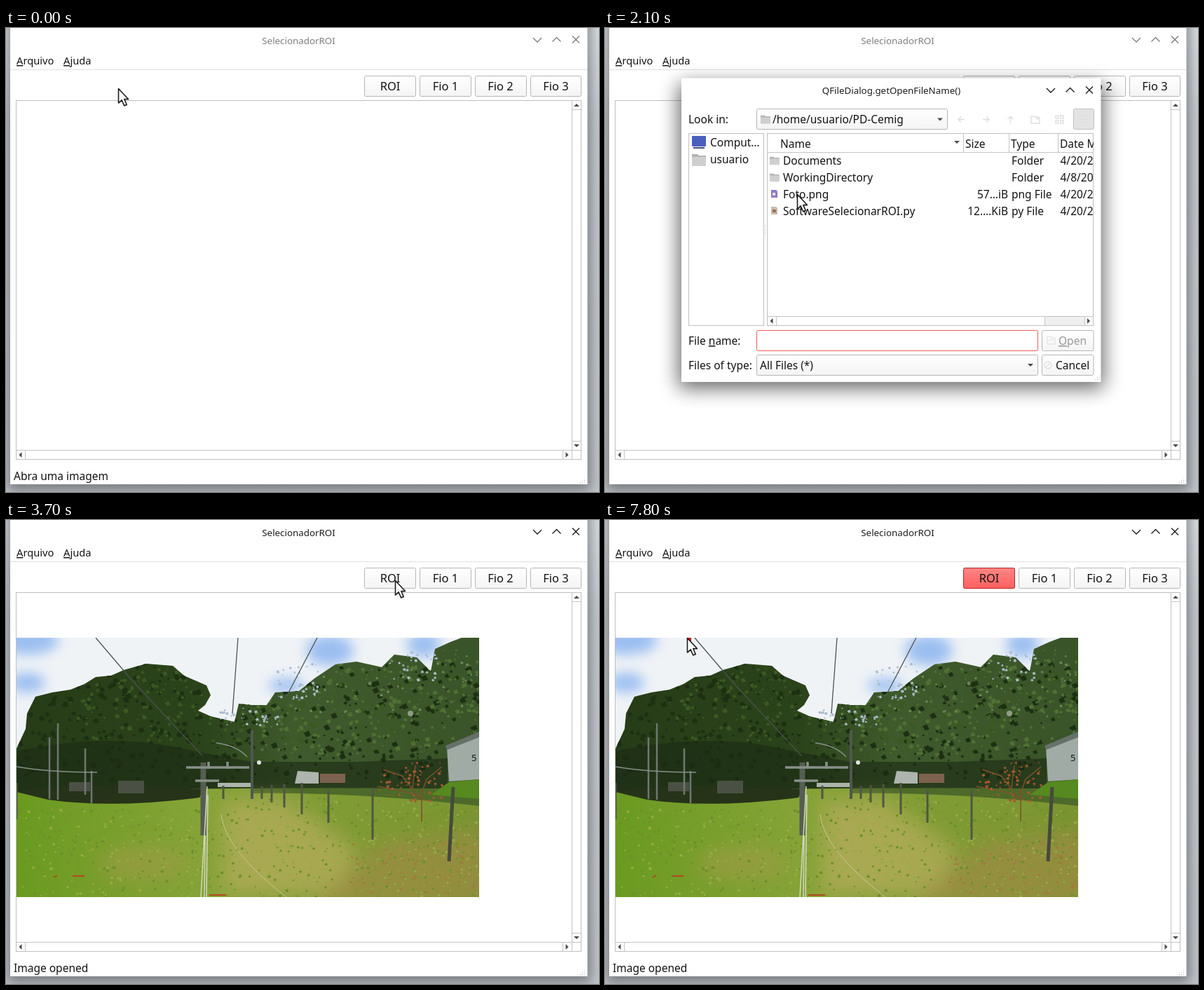
An HTML page for the animation above (8000 ms loop, 846 by 662 pixels).

```html
<!DOCTYPE html>
<html lang="pt">
<head>
<meta charset="utf-8">
<title>SelecionadorROI</title>
<style>
html, body { margin: 0; width: 100%; height: 100%; overflow: hidden; background: #b9bec4; }
svg { display: block; width: 846px; height: 662px; }
text { font: 15.5px "Noto Sans", sans-serif; fill: #141414; white-space: pre; }
.title { font-size: 13.33px; text-anchor: middle; fill: currentColor; }
.menu text, .menu-bar text { font-size: 14.7px; }
.buttons text { font-size: 16.5px; text-anchor: middle; }
.white text { fill: #fff; }
.end { text-anchor: end; }
.u { text-decoration: underline; }
.box { fill: #fff; stroke: #bfbfbf; }
.btn { fill: url(#button); stroke: #b6b6b6; }
.line { fill: none; stroke: #c4c4c4; }
.arrow { fill: #4a4a4a; }
.red { fill: #ec0000; }

.anim { animation: 8s step-end -10ms infinite; }
.focus { animation-name: focus; }
.welcome { animation-name: welcome; }
.menu { animation-name: menu; }
.hover { animation-name: hover; }
.dialog { animation-name: dialog; }
.opened { animation-name: opened; }
.pressed { animation-name: pressed; }
.dot { animation-name: dot; }
.cursor { animation-name: cursor; }

@keyframes focus {
  0%, 18.75% { color: #7d7f80; }
  10%, 33.75%, 100% { color: #1c1e1f; }
}
@keyframes welcome { 0% { opacity: 1; } 8.75%, 100% { opacity: 0; } }
@keyframes menu { 0%, 17.5%, 100% { opacity: 0; } 10% { opacity: 1; } }
@keyframes hover { 0%, 17.5%, 100% { opacity: 0; } 13.75% { opacity: 1; } }
@keyframes dialog { 0%, 30%, 100% { opacity: 0; } 18.75% { opacity: 1; } }
@keyframes opened { 0% { opacity: 0; } 33.75%, 100% { opacity: 1; } }
@keyframes pressed { 0% { opacity: 0; } 48.75%, 100% { opacity: 1; } }
@keyframes dot { 0% { opacity: 0; } 83.75%, 100% { opacity: 1; } }
@keyframes cursor {
  0% { transform: translate(160px, 86px); animation-timing-function: steps(9); }
  11.25% { transform: translate(46px, 50px); animation-timing-function: steps(2); }
  13.75%, 16.25% { transform: translate(53px, 64px); }
  16.25% { animation-timing-function: steps(8); }
  26.25% { transform: translate(274px, 237px); animation-timing-function: steps(5); }
  32.5% { transform: translate(282px, 233px); animation-timing-function: steps(5); }
  38.75% { transform: translate(620px, 322px); animation-timing-function: steps(4); }
  43.75% { transform: translate(538px, 92px); animation-timing-function: steps(2); }
  46.25%, 47.5% { transform: translate(555px, 86px); }
  47.5% { animation-timing-function: steps(9); }
  58.75% { transform: translate(163px, 167px); animation-timing-function: steps(5); }
  65% { transform: translate(136px, 164px); animation-timing-function: steps(4); }
  70% { transform: translate(119px, 169px); animation-timing-function: steps(2); }
  72.5% { transform: translate(118px, 169px); }
  76.25%, 82.5% { transform: translate(118px, 168px); }
  82.5% { animation-timing-function: steps(5); }
  88.75%, 90% { transform: translate(171px, 191px); }
  90% { animation-timing-function: steps(6); }
  97.5%, 100% { transform: translate(117px, 168px); }
}
</style>
</head>
<body>
<svg viewBox="0 0 846 662">
  <defs>
    <linearGradient id="desk" x2="0" y2="1"><stop stop-color="#d9dee3"/><stop offset=".2" stop-color="#c5cad0"/><stop offset="1" stop-color="#c0c5cb"/></linearGradient>
    <linearGradient id="button" x2="0" y2="1"><stop stop-color="#fff"/><stop offset="1" stop-color="#f4f4f4"/></linearGradient>
    <linearGradient id="redButton" x2="0" y2="1"><stop stop-color="#ff8585"/><stop offset="1" stop-color="#ff6060"/></linearGradient>
    <linearGradient id="foliage"><stop stop-color="#263c18"/><stop offset=".4" stop-color="#2b431a"/><stop offset=".6" stop-color="#3f5a2c"/><stop offset="1" stop-color="#3a5429"/></linearGradient>
    <linearGradient id="grass"><stop stop-color="#6a9a20"/><stop offset=".4" stop-color="#86a338"/><stop offset="1" stop-color="#7a9431"/></linearGradient>
    <filter id="soft" x="-20%" y="-20%" width="140%" height="140%"><feGaussianBlur stdDeviation="9"/></filter>
    <filter id="hazy" x="-50%" y="-50%" width="200%" height="200%"><feGaussianBlur stdDeviation="14"/></filter>
    <pattern id="grip" width="3" height="3" patternUnits="userSpaceOnUse"><path d="M0 0h1v1h-1z" fill="#b5b5b5"/></pattern>
    <clipPath id="photoClip"><path d="M15 168H674.500V538H15z"/></clipPath>
    <clipPath id="listClip"><path d="M232 151H697V425H232z"/></clipPath>
    <path id="treeShape" d="M15 326L28 298 30 276 42 252 66 246 92 242 112 234 128 224 150 222 168 214 200 205 238 208 254 222 286 236 292 250 284 264 274 272 292 280 326 288 332 262 350 264 372 264 384 246 418 244 440 226 470 206 500 202 536 210 554 192 586 196 606 216 612 184 634 174 650 168H675V400H15z"/>
    <clipPath id="treeClip"><use href="#treeShape"/></clipPath>
    <path id="lawnShape" d="M15 388Q300 380 675 384V538H15z"/>
    <clipPath id="lawnClip"><path d="M15 412H280L300 392Q500 390 675 410V538H15z"/></clipPath>
    <g id="controls" fill="none" stroke="currentColor" stroke-width="1.4"><path d="M752 14l6 6 6-6M779.500 19.500l6-6 6 6M808 11.500l10 10m0-10l-10 10"/></g>
    <g id="folder"><path d="M0 1h8l2 2h10v14h-20z" fill="#b4b4b4"/><path d="M0 5h20v13h-20z" fill="#cfcfcf"/></g>
    <path id="down" class="arrow" d="M-4-2h8l-4 4z"/>
    <path id="cursorShape" d="M0 0V20.500L4.600 16.300 8.100 24.300 11.700 22.700 8.300 15H14z"/>
  </defs>

  <rect width="846" height="662" fill="url(#desk)"/>
  <rect x="2" y="-30" width="832" height="690" opacity=".38" filter="url(#soft)"/>
  <rect x="6" y="-1" width="823.500" height="652" fill="#fff"/>

  <g class="anim focus">
    <text class="title" x="417.500" y="22.500">SelecionadorROI</text>
    <use href="#controls"/>
  </g>
  <g class="menu-bar">
    <text x="15" y="52"><tspan class="u">A</tspan>rquivo</text>
    <text x="82" y="52"><tspan class="u">A</tspan>juda</text>
  </g>
  <path class="line" style="stroke:#e0e0e0" d="M6 59.500H829"/>

  <g class="buttons">
    <rect class="btn" x="511.500" y="68.500" width="73" height="29" rx="2"/>
    <rect class="btn" x="590.500" y="68.500" width="73" height="29" rx="2"/>
    <rect class="btn" x="669.500" y="68.500" width="73" height="29" rx="2"/>
    <rect class="btn" x="748.500" y="68.500" width="72" height="29" rx="2"/>
    <rect class="anim pressed" x="511.500" y="68.500" width="73" height="29" rx="2" fill="url(#redButton)" stroke="#bd2020"/>
    <text x="548" y="89">ROI</text><text x="627" y="89">Fio 1</text>
    <text x="705.500" y="89">Fio 2</text><text x="784.500" y="89">Fio 3</text>
  </g>

  <rect class="box" x="14.500" y="103.500" width="806" height="512"/>
  <path class="line" d="M807.500 104V615M15 602.500H820M808 116.500h12M808 589.500h12M27.500 603v12M794.500 603v12"/>
  <use href="#down" transform="translate(814 110) scale(1 -1)"/>
  <use href="#down" transform="translate(814 596)"/>
  <use href="#down" transform="translate(20.500 609) rotate(90)"/>
  <use href="#down" transform="translate(800.500 609) rotate(-90)"/>
  <path fill="url(#grip)" d="M828 640V650H817z"/>

  <text class="anim welcome" x="11" y="645">Abra uma imagem</text>
  <text class="anim hover" x="11" y="645">Abrir imagem</text>
  <text class="anim opened" x="11" y="645">Image opened</text>

  <g class="anim opened"><g clip-path="url(#photoClip)">
    <rect x="15" y="168" width="660" height="370" fill="#f0f3f6"/>
    <g fill="#85b1f0" opacity=".8" filter="url(#soft)">
      <ellipse cx="30" cy="172" rx="45" ry="20"/><ellipse cx="30" cy="232" rx="26" ry="14"/>
      <ellipse cx="462" cy="186" rx="34" ry="22"/><ellipse cx="400" cy="236" rx="26" ry="10"/>
      <ellipse cx="596" cy="178" rx="24" ry="18"/>
    </g>
    <use href="#treeShape" fill="url(#foliage)"/>
    <g id="leaves" clip-path="url(#treeClip)"></g>
    <g id="gaps"></g>
    <path d="M15 330Q150 300 270 330L350 345 500 345 630 340V400H15z" fill="#1c2a14" opacity=".6"/>
    <path d="M302 375H350V381H302zM416 358L446 360V376H412z" fill="#aeb5ae"/><path d="M448 362H484V375H448z" fill="#7d6250"/>
    <use href="#lawnShape" fill="url(#grass)"/>
    <path d="M15 388Q90 374 282 384L276 396Q150 412 60 399z" fill="#263318"/>
    <path d="M350 383H620L675 396V408Q500 388 350 390z" fill="#4d6a2a"/>
    <g filter="url(#hazy)">
      <path d="M310 400H400L500 470 480 535H310z" fill="#b2ac58" opacity=".8"/>
      <path d="M540 460L690 440V550H430z" fill="#a08a48" opacity=".65"/>
      <ellipse cx="195" cy="490" rx="65" ry="24" fill="#a29c48" opacity=".6"/>
    </g>
    <g id="blades" clip-path="url(#lawnClip)"></g>
    <path d="M629 325L675 308V370L632 373z" fill="#a0aba5"/><path d="M627 322L675 302V310L629 328z" fill="#66716a"/>
    <path d="M632 374L675 370V398L606 392z" fill="#56891f"/>
    <text x="664" y="344" style="font-size:13px">5</text>
    <path d="M128 168L180 229 280 336M331 168L323 276M444 168L400 252" fill="none" stroke="#4b5352" stroke-width="1.300"/>
    <path d="M90 374h30v13h-30zM160 372h37v18h-37z" fill="#4a5144"/>
    <path d="M62 310V398M74 290V399M113 326V392M122 358V404" stroke="#6f7771" stroke-width="2.500"/>
    <path d="M15 352Q60 360 130 360M300 318Q330 322 344 338" fill="none" stroke="#87908a" stroke-width="1.300"/>
    <path d="M351 300V398" stroke="#4f5750" stroke-width="4"/><path d="M281.500 346V450" stroke="#565d51" stroke-width="8"/>
    <path d="M257 353H347M270 372H304M289 345V355M316 345V355" stroke="#899089" stroke-width="3.500"/>
    <path d="M287 380L278 538M284 450L283 538M288 392L286 538" fill="none" stroke="#d2d7c0" stroke-width="1.500"/>
    <path d="M307 420Q312 470 400 538" fill="none" stroke="#d5d8b0" opacity=".7"/>
    <path d="M15 375V427M310 379V398M365 380V398M379 378V403M397 377V410M422 375V420M460 384V432M523 382V456" fill="none" stroke="#515640" stroke-width="3"/>
    <path d="M638 381L632 487" stroke="#464a3d" stroke-width="5"/>
    <path d="M593 430V385M593 400L565 365 538 356M593 395L570 388 530 380M593 390L600 370 622 352M580 383L584 350" fill="none" stroke="#7c512c" stroke-width="1.500"/>
    <g id="blossom"></g>
    <circle cx="361" cy="346" r="3" fill="#e0e5e2"/><circle cx="577" cy="276" r="4" fill="#8f9c82"/>
    <path d="M95 508h17M68 510l5-3M290 535h24" stroke="#b04a22" stroke-width="2"/>
  </g></g>
  <rect class="anim dot" x="117.500" y="168" width="5.500" height="5" fill="#e30613"/>

  <g class="anim menu">
    <rect class="red" x="11" y="34" width="61" height="26"/>
    <g class="white"><text x="15" y="52"><tspan class="u">A</tspan>rquivo</text></g>
    <rect x="11.500" y="60.500" width="170" height="84" fill="#fff" stroke="#8e8e8e"/>
    <text x="39" y="80"><tspan class="u">A</tspan>brir</text><text x="124.500" y="80">Ctrl+O</text>
    <text x="39" y="108"><tspan class="u">S</tspan>alvar</text><text x="124.500" y="108">Ctrl+S</text>
    <text x="39" y="136.500"><tspan class="u">S</tspan>air</text><text x="124.500" y="136.500">Ctrl+Q</text>
    <g class="anim hover white">
      <rect class="red" x="12" y="60" width="170" height="28"/>
      <text x="39" y="80"><tspan class="u">A</tspan>brir</text><text x="124.500" y="80">Ctrl+O</text>
    </g>
  </g>

  <g class="anim dialog" color="#1c1e1f">
    <rect x="105" y="80" width="606" height="434" opacity=".6" filter="url(#hazy)"/>
    <rect x="109" y="71.500" width="598.500" height="433.500" fill="#fff"/>
    <text class="title" x="408.500" y="94">QFileDialog.getOpenFileName()</text>
    <use href="#controls" x="-122" y="72"/>

    <text x="119" y="136">Look in:</text>
    <rect class="btn" x="216.500" y="115.500" width="272" height="29" rx="2"/>
    <use href="#folder" transform="translate(222 124) scale(.7)"/>
    <text x="239" y="136">/home/usuario/PD-Cemig</text>
    <use href="#down" x="478" y="130.500"/>
    <rect x="668.500" y="115.500" width="29" height="29" rx="2" fill="#e3e3e3" stroke="#c0c0c0"/>
    <path fill="none" stroke="#dedede" stroke-width="1.400" d="M513 130.500h-9m4-4l-4 4 4 4M539 130.500h9m-4-4l4 4-4 4M578.500 136v-10m-4 4l4-4 4 4M608 126h5l2 2h5v8h-12zM617 131v-6M643 125h4v4h-4zM650 125h4v4h-4zM643 132h4v4h-4zM650 132h4v4h-4zM678 126h10M678 130h10M678 134h10"/>

    <rect class="box" x="119.500" y="150.500" width="107" height="274"/>
    <rect x="124" y="154" width="20" height="15" rx="1" fill="#4b5fbe"/><path d="M126 171h16" stroke="#46506f" stroke-width="2"/>
    <use href="#folder" x="124" y="179"/>
    <text x="150" y="169">Comput…</text><text x="150" y="193">usuario</text>
    <path fill="url(#grip)" d="M228 282h3v15h-3z"/>

    <rect class="box" x="231.500" y="150.500" width="465" height="274"/>
    <path class="line" d="M232 177.500H696M511.500 151V177M576.500 151V177M646.500 151V177M232 411.500H696M244.500 412V424M684.500 412V424"/>
    <rect x="627.500" y="411.500" width="57" height="13" fill="#efefef" stroke="#c4c4c4"/>
    <use href="#down" transform="translate(237.500 418) rotate(90)"/><use href="#down" transform="translate(690 418) rotate(-90)"/>
    <use href="#down" x="502" y="163"/>
    <g clip-path="url(#listClip)">
      <text x="250" y="170.500">Name</text><text x="514" y="170.500">Size</text><text x="579" y="170.500">Type</text><text x="649" y="170.500">Date Modified</text>
      <use href="#folder" transform="translate(235 183) scale(.68)"/><text x="254" y="195">Documents</text><text x="580" y="195">Folder</text><text x="649.500" y="195">4/20/21</text>
      <use href="#folder" transform="translate(235 207) scale(.68)"/><text x="254" y="219">WorkingDirectory</text><text x="580" y="219">Folder</text><text x="649.500" y="219">4/8/2021</text>
      <path d="M237 231h7l2 2v9h-9z" fill="#8f79bf"/><path d="M239 235h4v4h-4z" fill="#e6e0f3"/>
      <text x="254" y="243">Foto.png</text><text class="end" x="575" y="243">57…iB</text><text x="580" y="243">png File</text><text x="649.500" y="243">4/20/21</text>
      <path d="M237 255h7l2 2v9h-9z" fill="#c9bba8"/><path d="M239 259h5v4h-5z" fill="#9a6f5b"/>
      <text x="254" y="267">SoftwareSelecionarROI.py</text><text class="end" x="575" y="267">12.…KiB</text><text x="580" y="267">py File</text><text x="649.500" y="267">4/20/21</text>
    </g>

    <text x="119" y="452">File <tspan class="u">n</tspan>ame:</text>
    <rect x="216.500" y="431.500" width="401" height="29" rx="2" fill="#fff" stroke="#ee5a5a"/>
    <rect class="btn" x="623.500" y="431.500" width="73.500" height="29" rx="2"/>
    <path d="M631 440h5l1 2h5v9h-11zM633 445h7" fill="none" stroke="#dcdcdc"/>
    <text x="647" y="452" style="fill:#989898"><tspan class="u">O</tspan>pen</text>
    <text x="119" y="487">Files of type:</text>
    <rect class="btn" x="216.500" y="466.500" width="401" height="29" rx="2"/>
    <text x="221" y="487">All Files (*)</text><use href="#down" x="607" y="481"/>
    <rect class="btn" x="623.500" y="466.500" width="73.500" height="29" rx="2"/>
    <path d="M628.500 484.500l7-7M637 481a5 5 0 1 1-10 0a5 5 0 1 1 10 0" fill="none" stroke="#d2d2d2"/>
    <text x="643" y="487">Cancel</text>
    <path fill="url(#grip)" d="M707 494V504H696z"/>
  </g>

  <g class="anim cursor">
    <use href="#cursorShape" x="1.500" y="2" opacity=".2"/>
    <use href="#cursorShape" x=".5" y=".5" fill="#fff" stroke="#1a1a1a" stroke-width="1.600" stroke-linejoin="round"/>
  </g>
</svg>
<script>
let seed = 11;
const random = () => (seed = seed * 16807 % 2147483647) / 2147483647;

// One path of small angular flecks, scattered evenly over a box.
function scatter(id, color, count, [x, y, w, h], size) {
  let d = '';
  for (let i = 0; i < count; i++) {
    const s = size * (0.4 + random());
    d += `M${(x + w * random()).toFixed(1)} ${(y + h * random()).toFixed(1)}l${s} ${-s / 2} ${s / 2} ${s} ${-s} ${s / 3}z`;
  }
  const path = document.createElementNS('http://www.w3.org/2000/svg', 'path');
  path.setAttribute('d', d);
  path.setAttribute('fill', color);
  document.getElementById(id).append(path);
}

scatter('leaves', '#1d3012', 500, [15, 205, 660, 170], 5);
scatter('leaves', '#3a5922', 350, [90, 205, 560, 110], 4);
scatter('leaves', '#4f7034', 260, [350, 185, 325, 150], 4);
scatter('leaves', '#6c8758', 70, [400, 190, 270, 90], 2.5);
scatter('gaps', '#a9bccb', 45, [385, 205, 60, 50], 2.5);
scatter('gaps', '#a9bccb', 30, [545, 185, 70, 45], 2.5);
scatter('gaps', '#a9bccb', 35, [300, 268, 90, 24], 2.5);
scatter('blades', '#6c8f2c', 420, [15, 396, 660, 142], 2.5);
scatter('blades', '#97ab47', 380, [15, 400, 660, 138], 2.5);
scatter('blades', '#a07a42', 90, [490, 460, 185, 78], 2.5);
scatter('blossom', '#a8592e', 65, [525, 346, 95, 55], 2.5);
</script>
</body>
</html>
```
